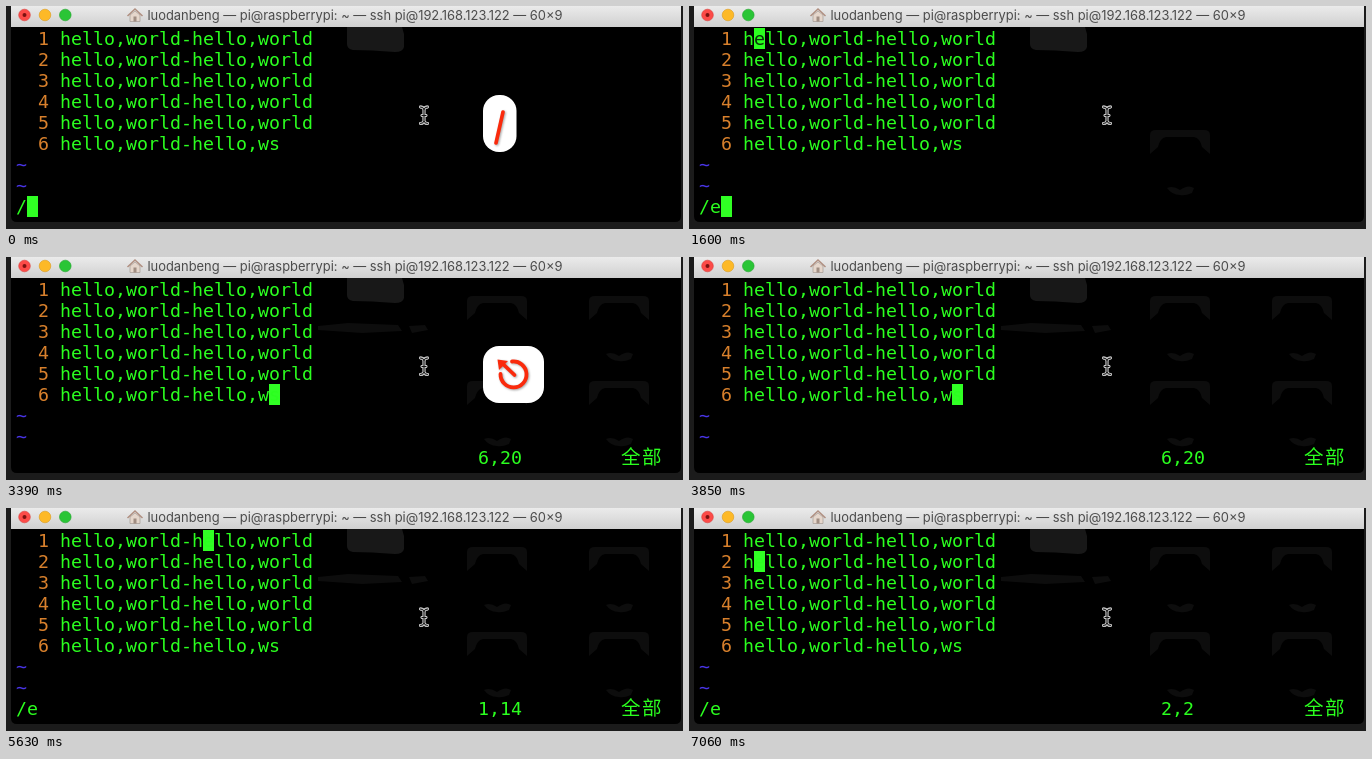
An HTML page for the animation above (8 s loop, 677 by 223 pixels).

```html
<!DOCTYPE html>
<html lang="en">
<head>
<meta charset="utf-8">
<title>Searching in vim</title>
<style>
  html, body { margin: 0; width: 100%; height: 100%; overflow: hidden; background: #1b1b1b; }
  svg { display: block; width: 677px; height: 223px; }
  .term text { font: 18.27px "DejaVu Sans Mono", monospace; fill: #2bff1f; white-space: pre; }
  .term .num { fill: #d8802c; }
  .term .tilde { fill: #4a35ea; }
  .term .dark { fill: #08300a; }
  .term .cjk { font: 19.5px "Noto Sans CJK SC", "Noto Sans CJK", sans-serif; }
  .title { font: 12.9px Inter, sans-serif; fill: #4b4b4b; text-anchor: middle; }
  .badge text { font: bold 37px "Liberation Sans", sans-serif; fill: #fa2a0c; text-anchor: middle; }
  .ink { filter: drop-shadow(1px 1.5px 1px #777a); }
  .stroke { fill: none; stroke: #fa2a0c; stroke-linecap: round; }
</style>
</head>
<body>
<svg viewBox="0 0 677 223">
  <defs>
    <linearGradient id="bar" x2="0" y2="1">
      <stop offset="0" stop-color="#ebebeb"/>
      <stop offset="1" stop-color="#d0d0d0"/>
    </linearGradient>
    <g id="shade">
      <path d="M461 129q0-5 6-5h48q6 0 6 5v19l-8-7q-2-9-8-10h-28q-6 1-8 10l-8 7z"/>
      <path d="M478 182q6-3 13 2 8-6 14-2l-2 5q-7 3-12 2-8 0-13-7z"/>
    </g>
  </defs>

  <path d="M5 0H675V210q0 6-6 6H11q-6 0-6-6z"/>
  <path d="M341 21h55l2 7v13q-1 5-9 5-24-2-42-2-6-1-6-6z" fill="#181818"/>
  <g id="shadeFirst" fill="#0d0d0d"><use href="#shade"/></g>
  <g id="shadeRest" fill="#0d0d0d">
    <use href="#shade" x="122"/>
    <use href="#shade" y="-85"/>
    <use href="#shade" x="122" y="-85"/>
    <path d="M312 69l30-3 50 2 4 6-40 2-44-3zM403 69l16-1 3 5-16 3z"/>
  </g>

  <rect x="5" width="670" height="21" fill="url(#bar)"/>
  <g stroke-width=".6">
    <circle cx="18.5" cy="9" r="5.8" fill="#fc4b48" stroke="#d93a36"/>
    <circle cx="18.5" cy="9" r="2" fill="#7c1210"/>
    <circle cx="39" cy="9" r="5.8" fill="#fdb927" stroke="#dc9a1c"/>
    <circle cx="59.3" cy="9" r="5.8" fill="#2ac536" stroke="#1ea329"/>
  </g>
  <path d="M124 9v6.5h10V9l-5-4z" fill="#e5d6cb" stroke="#a59b94" stroke-width=".7"/>
  <path d="M121.5 10l7.500-7 7.500 7" fill="none" stroke="#b08f80" stroke-width="1.500"/>
  <rect x="127.500" y="10.500" width="3" height="5" fill="#a08d82"/>
  <text class="title" x="349" y="14">luodanbeng — pi@raspberrypi: ~ — ssh pi@192.168.123.122 — 60×9</text>

  <g class="term" id="term">
    <rect id="cursor" width="11" height="21" fill="#30ff24"/>
  </g>

  <g fill="none" stroke-linecap="round">
    <path id="beam" d="M414.500 101q3 0 3.500 2.500 .500-2.500 3.500-2.500M418 103v12M414.500 117.500q3 0 3.500-2.500 .500 2.500 3.500 2.500M416 109.500h4" stroke="#c4c4c4" stroke-width="2.800"/>
    <use href="#beam"/>
    <path d="M414.500 101q3 0 3.500 2.500 .500-2.500 3.500-2.500M418 103v12M414.500 117.500q3 0 3.500-2.500 .500 2.500 3.500 2.500M416 109.500h4" stroke="#111" stroke-width="1"/>
  </g>

  <g class="badge" id="badgeSlash">
    <rect x="477" y="89" width="33.5" height="57" rx="16" fill="#fff"/>
    <path class="stroke ink" d="M497 106L490 137" stroke-width="3.6"/>
  </g>
  <g class="badge" id="badgeE">
    <rect x="477" y="89" width="43" height="57" rx="16" fill="#fff"/>
    <text class="ink" x="498.5" y="132">e</text>
  </g>
  <g class="badge" id="badgeEsc">
    <rect x="477" y="89" width="61" height="57" rx="16" fill="#fff"/>
    <g class="ink">
      <path class="stroke" d="M506 104.500A13 13 0 1 1 494.500 117" stroke-width="3.8"/>
      <path class="stroke" d="M508.500 118L497 107" stroke-width="3.8"/>
      <path d="M491.500 102.500l10.500 1.500-9 9z" fill="#fa2a0c"/>
    </g>
  </g>
  <g class="badge" id="badgeN">
    <rect x="477" y="89" width="44" height="57" rx="16" fill="#fff"/>
    <text class="ink" x="499" y="132">n</text>
  </g>
</svg>

<script>
  const LOOP = 8000, CELL_W = 11, ROW_H = 21, LEFT = 10, TOP = 22;
  const term = document.getElementById('term');
  const byId = id => document.getElementById(id);
  const cellX = col => LEFT + col * CELL_W;
  const rowY = row => TOP + row * ROW_H;

  function add(tag, attrs, parent = term) {
    const el = document.createElementNS('http://www.w3.org/2000/svg', tag);
    for (const key in attrs) el.setAttribute(key, attrs[key]);
    return parent.appendChild(el);
  }

  function write(col, row, text, cls = '', parent = term) {
    const el = add('text', { x: cellX(col), y: rowY(row) + 17, class: cls }, parent);
    el.textContent = text;
    return el;
  }

  // Each step is [time in ms, value]; values hold until the next step.
  function play(el, prop, steps) {
    const frames = [...steps, [LOOP, steps.at(-1)[1]]].map(([time, value]) =>
      ({ offset: time / LOOP, [prop]: value, easing: 'step-end' }));
    el.animate(frames, { duration: LOOP, iterations: Infinity });
  }
  const fade = (el, ...steps) => play(el, 'opacity', steps);

  for (let row = 0; row < 6; row++) {
    write(2, row, row + 1, 'num');
    write(4, row, row < 5 ? 'hello,world-hello,world' : 'hello,world-hello,ws');
  }
  write(0, 6, '~', 'tilde');
  write(0, 7, '~', 'tilde');

  // Incremental search match
  const match = add('g', {});
  add('rect', { x: cellX(5), y: rowY(0), width: CELL_W, height: ROW_H, fill: '#2bff1f' }, match);
  write(5, 0, 'e', 'dark', match);
  fade(match, [0, 0], [1060, 1], [3390, 0]);

  // Command line and ruler
  fade(write(0, 8, '/'), [0, 1], [3390, 0], [5090, 1]);
  fade(write(1, 8, 'e'), [0, 0], [1060, 1], [3390, 0], [5090, 1]);
  fade(write(42, 8, '6,20'), [0, 0], [3390, 1], [5090, 0]);
  fade(write(42, 8, '1,14'), [0, 0], [5090, 1], [6530, 0]);
  fade(write(42, 8, '2,2'), [0, 0], [6530, 1]);
  for (const [col, char] of [[55, '全'], [56.9, '部']])
    fade(write(col, 8, char, 'cjk'), [0, 0], [3390, 1]);

  const at = (col, row) => `translate(${cellX(col)}px, ${rowY(row)}px)`;
  play(byId('cursor'), 'transform', [
    [0, at(1, 8)], [1060, at(2, 8)], [3390, at(23, 5)], [5090, at(17, 0)], [6530, at(5, 1)]
  ]);
  fade(byId('cursor'), [0, 1], [1000, 0], [1060, 1], [2070, 0], [2550, 1],
    [3030, 0], [3390, 1], [4390, 0], [4930, 1]);

  // Pressed keys
  fade(byId('badgeSlash'), [0, 1], [410, .5], [530, 0]);
  fade(byId('badgeE'), [0, 0], [1000, 1], [1480, .7], [1540, .35], [1600, 0]);
  fade(byId('badgeEsc'), [0, 0], [3210, 1], [3690, .7], [3770, .35], [3850, 0]);
  fade(byId('badgeN'), [0, 0], [4990, 1], [5570, .5], [5630, 0], [6530, 1], [7000, .5], [7060, 0]);

  fade(byId('shadeFirst'), [0, 0], [1000, 1]);
  fade(byId('shadeRest'), [0, 0], [3210, 1]);
</script>
</body>
</html>
```
